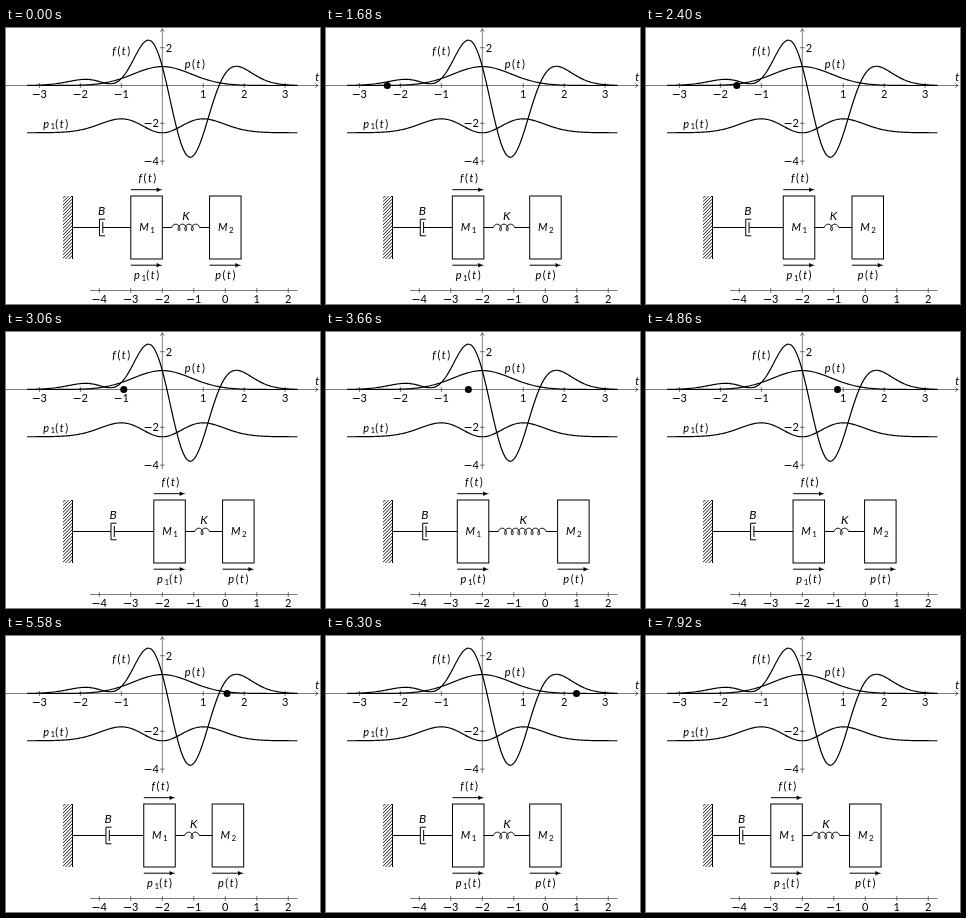
Animation of 314 by 276 pixels, one loop 8040 ms. Source, as an HTML page:

```html
<!DOCTYPE html>
<html lang="en">
<head>
<meta charset="utf-8">
<title>Two masses and a spring</title>
<style>
  html, body { margin: 0; width: 100%; height: 100%; overflow: hidden; background: #fff; }
  svg { display: block; width: 314px; height: 276px; }
  .thin { fill: none; stroke: #000; stroke-width: .52; }
  .thick { fill: none; stroke: #000; stroke-width: 1; }
  .bold { fill: none; stroke: #000; stroke-width: 1.2; }
  .hatch { stroke: #000; stroke-width: .9; }
  text { font: 11px Lato, "Open Sans", sans-serif; text-anchor: middle; }
  .math { font-style: italic; letter-spacing: 1.5px; }
  .name { font-size: 12px; }
  .up { font-style: normal; }
  .sub { font-size: 8px; font-style: normal; letter-spacing: .2px; }
  .minus { font-family: "DejaVu Sans", sans-serif; }
</style>
</head>
<body>
<svg id="stage" viewBox="0 0 314 276">
  <clipPath id="wall"><rect x="57" y="168" width="9.5" height="63"/></clipPath>
  <clipPath id="view"><rect width="312" height="276"/></clipPath>
</svg>
<script>
const NS = 'http://www.w3.org/2000/svg';
const stage = document.getElementById('stage');
const CM = 31.5, PT = CM / 28.45;
const X0 = 156.3, Y0 = 57.5, UX = 1.3 * CM, UY = 0.6 * CM;
const ZERO = 219.3, MID = 199.5, WALL = 66.5;
const LOOP = 8040, STEP = 60;

const p = t => Math.exp(-t * t);
const p1 = t => 2 * t * t * p(t);
const force = t => (4 * t * (t + 1) * (t * t - 2) + 1) * p(t);

function add(tag, attrs, parent = stage) {
  const el = document.createElementNS(NS, tag);
  for (const k in attrs) el.setAttribute(k, attrs[k]);
  return parent.appendChild(el);
}
const path = (d, cls, parent) => add('path', { d, class: cls }, parent);
const points = list => 'M' + list.map(q => q.map(v => v.toFixed(2)).join(' ')).join('L');

// "_" marks a subscript digit; brackets stand upright
function math(s, x, y, parent) {
  const el = add('text', { x, y, class: 'math' }, parent);
  let drop = 0;
  for (const [part] of s.matchAll(/_\d|[()]|[^_()]/g)) {
    const sub = part[0] === '_';
    const span = add('tspan', { dy: (sub ? 1.8 : 0) - drop }, el);
    drop = sub ? 1.8 : 0;
    if (sub) span.setAttribute('class', 'sub');
    else if ('()'.includes(part)) span.setAttribute('class', 'up');
    span.textContent = sub ? part[1] : part;
  }
  return el;
}

function partName(s, y) {
  const el = add('text', { y, class: 'math name' });
  el.textContent = s;
  return el;
}

// x is the centre of the whole label, sign included
function number(n, x, y) {
  add('text', { x: n < 0 ? x + 4.3 : x, y }).textContent = Math.abs(n);
  if (n < 0) add('text', { x: x - 3.2, y, class: 'minus' }).textContent = '−';
}

function plot(fn) {
  const list = [];
  for (let i = 0; i <= 264; i++) {
    const t = -3.3 + i / 40;
    list.push([X0 + UX * t, Y0 - UY * fn(t)]);
  }
  path(points(list), 'bold');
}

function drawGraph() {
  path(`M0 ${Y0}H312M309.3 ${Y0 - 2.3}Q310.2 ${Y0 - .4} 312.3 ${Y0}Q310.2 ${Y0 + .4} 309.3 ${Y0 + 2.3}`, 'thin');
  path(`M${X0} 137V1M${X0 - 2.3} 3.6Q${X0 - .4} 2.7 ${X0} .7Q${X0 + .4} 2.7 ${X0 + 2.3} 3.6`, 'thin');
  for (const n of [-3, -2, -1, 1, 2, 3]) {
    const x = X0 + n * UX;
    path(`M${x} ${Y0 - 2.5}v5`, 'thin');
    number(n, x, 70.3);
  }
  for (const n of [2, -2, -4]) {
    const y = Y0 - n * UY;
    path(`M${X0 - 2.5} ${y}h5`, 'thin');
    number(n, n > 0 ? 163 : 145.3, y + 4);
  }
  [force, p, t => p1(t) - 2.5].forEach(plot);
  math('f(t)', 116, 26.5);
  math('p(t)', 189.6, 40.3);
  math('p_1(t)', 50.4, 99.5);
  math('t', 312, 52.5);
}

function drawRuler() {
  path(`M${ZERO - 4.3 * CM} 262.5H${ZERO + 2.3 * CM}`, 'thin');
  for (let n = -4; n <= 2; n++) {
    const x = ZERO + n * CM;
    path(`M${x} 260v5`, 'thin');
    number(n, x, 275.2);
  }
}

function drawWall() {
  const g = add('g', { 'clip-path': 'url(#wall)' });
  let d = '';
  for (let y = 168; y < 245; y += 3 * PT) d += `M56 ${y}l12 -12`;
  path(d, 'hatch', g);
  path(`M${WALL} 168v63`, 'thick');
}

function arrow(y, parent) {
  path(`M0 ${y}H${CM - 4}`, 'thick', parent);
  add('path', { d: `M${CM + .4} ${y}q-3.2 .5 -6 2.2v-4.4q2.8 1.7 6 2.2z` }, parent);
}

// a block with its left edge at x = 0
function block(name, pos) {
  const g = add('g', {});
  add('rect', { y: MID - CM, width: CM, height: 2 * CM, class: 'thick' }, g);
  math(name, CM / 2 + .5, 203, g);
  arrow(237.2, g);
  math(pos, CM / 2 + .8, 251.3, g);
  return g;
}

function damperPath(a, b) {
  const m = (a + b) / 2 - .5, l = m - 1.5 * PT, r = m + 1.5 * PT, h = 7.5 * PT;
  return `M${a} ${MID}H${l}M${r + 2 * PT} ${MID - h}H${l}v${2 * h}H${r + 2 * PT}` +
    `M${r} ${MID - 5 * PT}v${10 * PT}M${r} ${MID}H${b}`;
}

// whole turns of fixed pitch, a half turn, then a straight rest
function springPath(a, b) {
  const pitch = 6 * PT, amp = 3 * PT, swing = .7 * amp, lead = .3 * CM;
  const room = b - a - 2 * lead, need = 1.5 * pitch + 2 * swing;
  const turns = room < need ? 0 : Math.floor((room - need) / pitch) + 1;
  const list = [[a, MID]];
  for (let i = 0; i <= turns * 24 + 12; i++) {
    const u = i / 24, w = u * 2 * Math.PI;
    list.push([a + lead + swing * (1 - Math.cos(w)) + pitch * u, MID - amp * Math.sin(w)]);
  }
  list.push([b, MID]);
  return points(list);
}

drawGraph();
drawRuler();
drawWall();
const m1 = block('M_1', 'p_1(t)');
arrow(161.7, m1);
math('f(t)', CM / 2 + 1.6, 153.8, m1);
const m2 = block('M_2', 'p(t)');
const damper = path('', 'thick'), spring = path('', 'thick');
const nameB = partName('B', 187.4), nameK = partName('K', 191.6);
const dot = add('circle', { cy: Y0, r: 3.5 }, add('g', { 'clip-path': 'url(#view)' }));

function pose(ms) {
  const t = ms / 1000 - 4;
  const left = ZERO + (p1(t) - 3) * CM, right = ZERO + (p(t) - .5) * CM;
  m1.setAttribute('transform', `translate(${left} 0)`);
  m2.setAttribute('transform', `translate(${right} 0)`);
  damper.setAttribute('d', damperPath(WALL, left));
  spring.setAttribute('d', springPath(left + CM, right));
  nameB.setAttribute('x', (WALL + left) / 2 + .8);
  nameK.setAttribute('x', (left + CM + right) / 2 + .8);
  dot.setAttribute('cx', X0 + UX * t);
}

const start = performance.now();
function tick() {
  const ms = Math.floor((performance.now() - start) % LOOP / STEP) * STEP;
  pose(ms < 120 ? 0 : Math.min(ms, 7920));
  requestAnimationFrame(tick);
}
tick();
</script>
</body>
</html>
```
